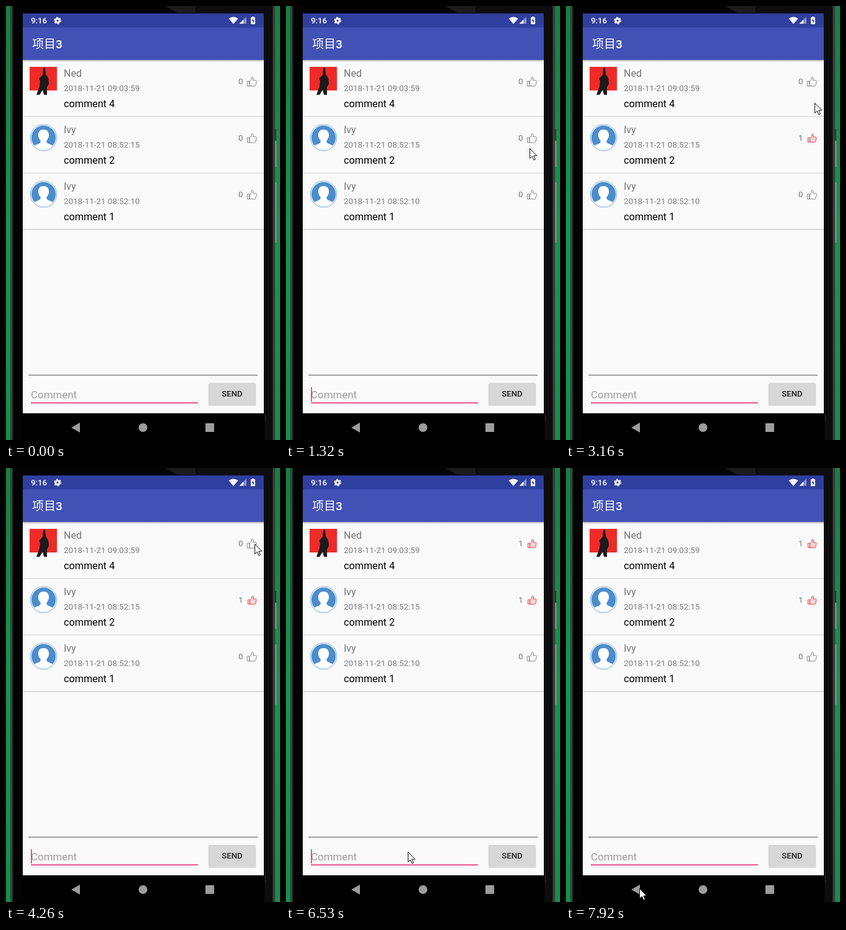
An HTML page that plays this animation: 441x699 px, repeating every 8000 ms.

```html
<!DOCTYPE html>
<html lang="en">
<head>
<meta charset="utf-8">
<title>Comment list</title>
<style>
  html, body { margin: 0; width: 100%; height: 100%; overflow: hidden; background: #000; }
  svg { display: block; width: 441px; height: 699px; }
  text { font-family: Roboto, "Noto Sans CJK SC", "Noto Sans CJK", sans-serif; white-space: pre; }
</style>
</head>
<body>
<svg viewBox="0 0 441 699" xmlns="http://www.w3.org/2000/svg">
  <defs>
    <linearGradient id="desk" x2="0" y2="1">
      <stop offset="0" stop-color="#12823f"/>
      <stop offset=".5" stop-color="#109a4b"/>
      <stop offset="1" stop-color="#11924a"/>
    </linearGradient>
    <linearGradient id="edge">
      <stop offset="0" stop-color="#2a2a2c"/>
      <stop offset=".35" stop-color="#4a4a4d"/>
      <stop offset="1" stop-color="#0a0a0a"/>
    </linearGradient>
    <linearGradient id="shade" x2="0" y2="1">
      <stop offset="0" stop-color="#000" stop-opacity=".22"/>
      <stop offset="1" stop-color="#000" stop-opacity="0"/>
    </linearGradient>
    <clipPath id="disc"><circle r="19.6"/></clipPath>
    <g id="person">
      <circle r="21.2" fill="#fff" stroke="#6b9fd4" stroke-width=".9"/>
      <g clip-path="url(#disc)">
        <rect x="-21" y="-21" width="42" height="42" fill="#4d8dcc"/>
        <path d="M0-13c6 0 9 4 8.5 10-.4 4-2 6-3.8 8 0 3 1 4 5 5.5 5 2 8 4 9 10.500H-18.700c1-6.500 4-8.500 9-10.500 4-1.500 5-2.500 5-5.500-1.800-2-3.400-4-3.800-8C-9-9-6-13 0-13z" fill="#fff"/>
      </g>
    </g>
    <g id="poster">
      <rect width="44" height="38" fill="#ee2b28"/>
      <path d="M22 2l3-1 1 11 4 6 1 9-3 6 0 12h-5l-2-8-5 8h-5l5-14 1-8-2-4 6-6z" fill="#1c1a1b"/>
    </g>
    <g id="thumb" stroke-width="1" stroke-linejoin="round">
      <path d="M.5 7.300H4V15.200H.5z"/>
      <path d="M4 8L7.300 4.800V2C7.300.1 10.200-.1 10.200 2.700L9.700 5.900H13.800Q15.600 6 15.300 7.700L14.100 13.800Q13.800 15.200 12.400 15.200H4z"/>
    </g>
  </defs>

  <rect width="441" height="699" fill="url(#desk)"/>
  <rect x="432" y="198" width="3" height="60" fill="#3a3539"/>
  <rect x="432" y="217" width="3.500" height="42" rx="1" fill="#96858f"/>
  <rect x="432" y="284" width="3.500" height="97" rx="1" fill="#96858f"/>
  <rect x="7" width="426" height="699" fill="#111"/>
  <rect x="7" width="5" height="699" fill="url(#edge)"/>
  <rect x="428" width="5" height="699" fill="url(#edge)" transform="matrix(-1 0 0 1 861 0)"/>
  <rect x="12" width="416" height="699" fill="#030303"/>
  <path d="M256 0H305V11H276z" fill="#1b1b1b"/>
  <path d="M305 0H428V699H416V12H305z" fill="#0d0d0d"/>
  <path d="M417.500 656V668" stroke="#222"/>

  <rect x="27" y="12" width="388" height="687" fill="#000"/>
  <rect x="27" y="34" width="388" height="622" fill="#fafafa"/>
  <rect x="27" y="12" width="388" height="23" fill="#2f3f9f"/>
  <rect x="27" y="34.500" width="388" height="52.500" fill="#4151b5"/>
  <rect x="27" y="87" width="388" height="4" fill="url(#shade)"/>
  <g fill="#fff">
    <text x="40" y="28" font-size="13.200" font-weight="500">9:16</text>
    <text x="42" y="68" font-size="19" font-weight="500"><tspan font-weight="400">项目</tspan>3</text>
    <circle cx="83" cy="23.500" r="3.200" fill="none" stroke="#fff" stroke-width="2.800"/>
    <circle cx="83" cy="23.500" r="5.100" fill="none" stroke="#fff" stroke-width="1.800" stroke-dasharray="2.670"/>
    <path d="M358.500 20.300Q366 14.500 373.500 20.300L366 29z"/>
    <path d="M387 17.500V28.500H375.500z" opacity=".45"/>
    <path d="M382 22.300V28.500H375.500z"/>
    <path d="M396 17h3v1.300h2V29.300h-7V18.300h2z"/>
    <path d="M398.200 19.800l-2.700 4.400h1.600v3.500l2.700-4.500h-1.600z" fill="#2f3f9f"/>
  </g>

  <g id="rows"></g>

  <path d="M36 594.500H405" stroke="#555"/>
  <text x="40" y="632" font-size="16.900" fill="#9b9b9b">Comment</text>
  <rect x="40" y="638.300" width="269" height="1.900" fill="#ee4684"/>
  <rect id="caret" x="40" y="614" width="1.800" height="23" fill="#f2407f"/>
  <rect x="325.500" y="608" width="77" height="36" rx="2" fill="#000" opacity=".13"/>
  <rect x="326" y="607" width="76" height="35.500" rx="2" fill="#d7d7d7"/>
  <text x="364" y="629" font-size="13.200" font-weight="500" text-anchor="middle" fill="#202020">SEND</text>

  <g fill="#9c9c9c">
    <path d="M105 679L119 671V687z"/>
    <circle cx="220.500" cy="679" r="7"/>
    <rect x="321" y="672" width="14" height="14" rx=".6"/>
  </g>

  <path id="cursor" d="M.5.5V16.500L4.200 13L6.900 19L9.300 18L6.700 12.100H11.700z" fill="#fff" stroke="#111" stroke-width="1"/>
</svg>
<script>
const LOOP = 8000, STEP = 91;
const $ = id => document.getElementById(id);

const comments = [
  { name: "Ned", date: "2018-11-21 09:03:59", body: "comment 4", likedAt: 4480 },
  { name: "Ivy", date: "2018-11-21 08:52:15", body: "comment 2", likedAt: 2020 },
  { name: "Ivy", date: "2018-11-21 08:52:10", body: "comment 1", likedAt: Infinity }
];

// [time, x, y] of the pointer tip
const track = [
  [70, 431, 648], [300, 420, 455], [550, 402, 310], [870, 393, 235],
  [1320, 392, 229], [1720, 396, 218], [2130, 397, 212], [2560, 398, 190],
  [3160, 400, 156], [3460, 401, 144], [3900, 402, 111], [4260, 400, 122],
  [4750, 399, 125], [5130, 390, 141], [5530, 353, 255], [6030, 233, 500],
  [6530, 196, 618], [6930, 165, 658], [7760, 119, 674], [7920, 118, 677]
];
const caretFlips = [970, 2100, 3230, 4340, 5600, 7030];

const label = (x, y, size, fill, str, extra = "") =>
  `<text x="${x}" y="${y}" font-size="${size}" fill="${fill}" ${extra}>${str}</text>`;

$("rows").innerHTML = comments.map((c, i) => `
  <g transform="translate(0 ${i * STEP})">
    ${i ? '<use href="#person" x="60.500" y="121"/>' : '<use href="#poster" x="38" y="98"/>'}
    ${label(93, 114, 16, "#757575", c.name)}
    ${label(93, 137, 13.35, "#7b7b7b", c.date)}
    ${label(93, 163, 16.2, "#000", c.body)}
    ${label(374, 126, 13.2, "#757575", "0", 'class="count"')}
    <use class="like" href="#thumb"/>
    <path d="M27 178H415" stroke="${i < 2 ? "#dcdcdc" : "#cfcfcf"}" stroke-width="1.500"/>
  </g>`).join("");

const counts = document.querySelectorAll(".count");
const likes = document.querySelectorAll(".like");

function tipAt(t) {
  const n = track.findIndex(k => k[0] > t);
  if (n < 0) return track[track.length - 1].slice(1);
  const a = track[n - 1], b = track[n];
  const p = (t - a[0]) / (b[0] - a[0]);
  return [a[1] + (b[1] - a[1]) * p, a[2] + (b[2] - a[2]) * p];
}

function render(t) {
  comments.forEach((c, i) => {
    const on = t >= c.likedAt;
    counts[i].textContent = on ? "1" : "0";
    likes[i].setAttribute("fill", on ? "#f8d3d2" : "none");
    likes[i].setAttribute("stroke", on ? "#d2423f" : "#858585");
    likes[i].setAttribute("transform", on ? "translate(389 114.500) scale(.91)" : "translate(387.800 113.800)");
  });
  const flips = caretFlips.filter(f => t >= f).length;
  $("caret").style.display = flips % 2 ? "" : "none";
  const shown = t >= track[0][0];
  $("cursor").style.display = shown ? "" : "none";
  if (shown) $("cursor").setAttribute("transform", `translate(${tipAt(t).map(Math.round)})`);
}

const start = performance.now();
function tick() {
  render((performance.now() - start) % LOOP);
  requestAnimationFrame(tick);
}
tick();
</script>
</body>
</html>
```
